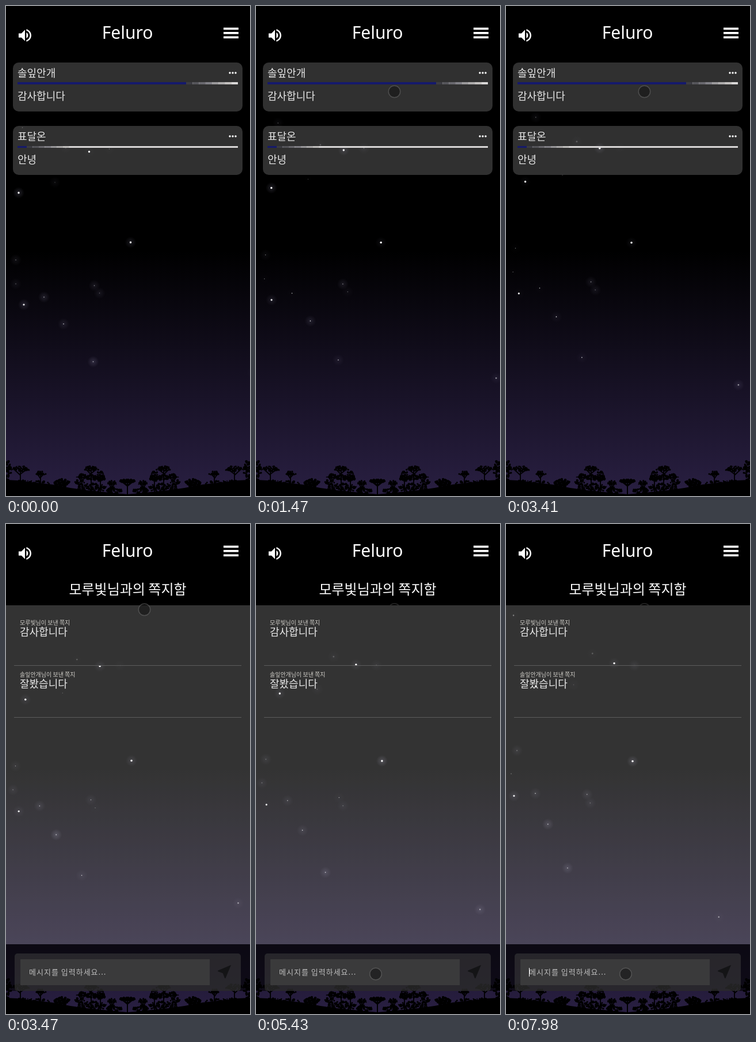
These frames come from a looping animation (424 by 850 pixels, 8 s). An HTML page with a canvas:

```html
<!DOCTYPE html>
<html lang="ko">
<head>
<meta charset="utf-8">
<title>쪽지함</title>
<style>
html, body { margin: 0; width: 100%; height: 100%; overflow: hidden; background: #000; }
canvas { display: block; }
</style>
</head>
<body>
<canvas id="stage" width="424" height="850"></canvas>
<script>
const W = 424, H = 850, LOOP = 8000, OPEN_AT = 3470;
const ctx = document.getElementById('stage').getContext('2d');
const FONT = '"Noto Sans CJK KR", "Noto Sans CJK", sans-serif';
const SPEAKER = new Path2D('M3 9v6h4l5 5V4L7 9H3zm13.5 3c0-1.77-1.02-3.29-2.5-4.03v8.05c1.48-.73 2.5-2.25 2.5-4.02zM14 3.23v2.06c2.89.86 5 3.54 5 6.71s-2.11 5.85-5 6.71v2.06c4.01-.91 7-4.49 7-8.77s-2.99-7.86-7-8.77z');
const SEND = new Path2D('M21 3L3 10.53v.98l6.84 2.65L12.48 21h.98L21 3z');

// x, y at time 0, radius, opacity
const stars = [
  [144.5, 252.8, 1.7, 1], [22, 324, 1.7, 1], [216.5, 410, 1.7, 1], [31, 518, 1.6, .9],
  [100, 551.5, .8, .9], [151.5, 617, .8, .8], [66, 505, .8, .7], [153.5, 485, .8, .55],
  [162.5, 498, .7, .4], [17, 440.5, .7, .5], [17, 482, .7, .45], [179.5, 248, .7, .35],
  [85, 306, .7, .25], [28.5, 211, .8, .35], [103.7, 245.5, 1.4, .2], [427, 636, 1.2, .55],
  [-45.4, 214.4, 1.2, .4]
];

// time, x, y
const pointerKeys = [
  [0, 250, 865], [100, 250, 865], [840, 242, 176], [1000, 240.5, 148.5], [4230, 240.5, 148.5],
  [4690, 206.5, 717.5], [5040, 208, 779], [5300, 208, 780.5], [LOOP, 208, 780.5]
];

const noise = (a, b) => {
  const v = Math.sin(a * 127.1 + b * 311.7) * 43758.5453;
  return v - Math.floor(v);
};

function rect(x, y, w, h, color, radius = 0) {
  ctx.fillStyle = color;
  ctx.beginPath();
  ctx.roundRect(x, y, w, h, radius);
  ctx.fill();
}

function disc(c, x, y, r) {
  c.beginPath();
  c.arc(x, y, r, 0, 7);
  c.fill();
}

function text(value, x, y, size, { color = '#e6e6e6', weight = 300, align = 'left', spacing = 0, family = FONT } = {}) {
  ctx.font = `${weight} ${size}px ${family}`;
  ctx.fillStyle = color;
  ctx.textAlign = align;
  ctx.letterSpacing = spacing + 'px';
  ctx.fillText(value, x, y);
}

function icon(path, x, y, scale, color) {
  ctx.save();
  ctx.translate(x, y);
  ctx.scale(scale, scale);
  ctx.fillStyle = color;
  ctx.fill(path);
  ctx.restore();
}

function makeForest() {
  const layer = document.createElement('canvas');
  layer.width = W;
  layer.height = H;
  const c = layer.getContext('2d');
  let seed = 1;
  const rnd = () => noise(seed++, 3);
  const leaves = (x, y, w, h, count, size = 2) => {
    for (let i = 0; i < count; i++) {
      const a = rnd() * 6.283, d = Math.sqrt(rnd());
      disc(c, x + Math.cos(a) * d * w / 2, y + Math.sin(a) * d * h / 2, size * (.5 + rnd() * .7));
    }
  };
  const tree = (x, top, w, h, base) => {
    leaves(x, top + h / 2, w * .8, h, w * 1.6, 1.5);
    leaves(x, top + h * .7, w, h * .5, w, 1.3);
    c.lineWidth = 1.8;
    c.beginPath();
    c.moveTo(x, base);
    c.lineTo(x, top + h / 2);
    c.moveTo(x, top + h + 6);
    c.lineTo(x - w * .3, top + h * .7);
    c.moveTo(x, top + h + 4);
    c.lineTo(x + w * .3, top + h * .7);
    c.stroke();
  };
  const half = () => {
    leaves(2, 806, 14, 34, 60);
    tree(25, 798, 32, 10, 828);
    tree(60, 807, 18, 7, 830);
    tree(148, 798, 28, 9, 845);
    tree(132, 811, 20, 9, 845);
    tree(164, 807, 16, 11, 845);
    tree(184, 823, 18, 8, 848);
    leaves(97, 827, 26, 15, 75);
    leaves(148, 818, 20, 11, 35);
    leaves(128, 826, 16, 10, 25);
    leaves(165, 820, 15, 9, 30);
    leaves(150, 836, 52, 15, 75);
    leaves(40, 828, 78, 10, 75);
    leaves(188, 840, 26, 11, 45);
    c.beginPath();
    c.moveTo(0, 822);
    for (const [x, y] of [[20, 823], [45, 826], [80, 830], [112, 836], [140, 840], [180, 844], [211, 847], [211, H], [0, H]]) c.lineTo(x, y);
    c.fill();
    tree(211, 821, 32, 6, H);
  };
  half();
  c.setTransform(-1, 0, 0, 1, 422, 0);
  seed = 1;
  half();
  c.setTransform(1, 0, 0, 1, 0, 0);
  c.fillRect(421, 822, 3, 28);
  return layer;
}
const forest = makeForest();

function drawSky(t) {
  const sky = ctx.createLinearGradient(0, 0, 0, H);
  sky.addColorStop(.5, '#000');
  sky.addColorStop(1, '#291f42');
  rect(0, 0, W, H, sky);

  const angle = t / 1000 * 1.75 * Math.PI / 180, tick = Math.floor(t / 50);
  ctx.save();
  ctx.translate(W / 2, H / 2);
  stars.forEach(([x0, y0, r, alpha], i) => {
    const dx = x0 - W / 2, dy = y0 - H / 2;
    const x = dx * Math.cos(angle) - dy * Math.sin(angle);
    const y = dx * Math.sin(angle) + dy * Math.cos(angle);
    const flicker = noise(i + 1, tick + 1);
    const glow = ctx.createRadialGradient(x, y, 0, x, y, 10);
    glow.addColorStop(0, `rgba(190,185,225,${.22 * flicker * alpha})`);
    glow.addColorStop(1, 'rgba(190,185,225,0)');
    ctx.fillStyle = glow;
    disc(ctx, x, y, 10);
    ctx.fillStyle = `rgba(255,255,255,${alpha})`;
    disc(ctx, x, y, r);
  });
  ctx.restore();
  ctx.drawImage(forest, 0, 0);
}

function drawHeader(height) {
  rect(0, 0, W, height, '#000');
  icon(SPEAKER, 18.3, 36.4, 1.22, '#fff');
  text('Feluro', 211, 57, 30, { color: '#fff', weight: 400, align: 'center', family: '"Noto Sans", sans-serif' });
  for (const y of [37.5, 45, 52.5]) rect(378, y, 26, 3.7, '#fff');
}

function drawCard(y, name, message, barY, barHeight, progress, step) {
  rect(12, y, 399, 85, 'rgba(255,255,255,.19)', 10);
  text(name, 20, y + 25, 18);
  text(message, 20, y + 64.5, 18);
  ctx.fillStyle = '#fff';
  for (const x of [389, 394, 399]) disc(ctx, x, y + 18, 1.7);
  rect(20, barY, 383, barHeight, '#d8d6d6');
  ['#3c3c42', '#55555a', '#69686e', '#807f85', '#99989a', '#adabab', '#c2c0be'].forEach((color, i) =>
    rect(progress + i * step, barY, step, barHeight, color));
  rect(20, barY, progress - 20, barHeight, '#151a6c');
}

function drawList() {
  drawHeader(70);
  drawCard(98, '솔잎안개', '감사합니다', 132, 4, 313, 11.3);
  drawCard(208, '표달온', '안녕', 243, 3, 36, 10.5);
}

function drawNote(y, sender, message) {
  text(sender + '님이 보낸 쪽지', 24, y, 10, { color: '#d0cec8', weight: 400 });
  text(message, 24, y + 19, 18);
  rect(14, y + 70, 395, 1, '#5c5c5c');
}

function drawInbox(t) {
  drawHeader(141);
  text('모루빛님과의 쪽지함', 211.5, 122, 24, { color: '#fff', weight: 400, align: 'center' });
  rect(0, 141, W, 588, 'rgba(255,255,255,.2)');
  drawNote(175, '모루빛', '감사합니다');
  drawNote(265, '솔잎안개', '잘봤습니다');

  rect(0, 729, W, 81, 'rgba(0,0,0,.6)');
  rect(15, 745, 393, 65, 'rgba(62,61,62,.56)', 5);
  rect(25, 755, 329, 45, '#3a3a3b');
  text('메시지를 입력하세요...', 40, 782, 13, { color: '#bdbdbd', weight: 400, spacing: 1 });
  icon(SEND, 364.2, 761.2, 1.28, '#141416');
  const caretOn = t >= 6420 && Math.floor((t - 6420) / 530) % 2 === 0;
  if (caretOn) rect(40, 770, 1, 15, '#fff');
}

function drawPointer(t) {
  const i = Math.max(1, pointerKeys.findIndex(key => key[0] > t));
  const [t0, x0, y0] = pointerKeys[i - 1], [t1, x1, y1] = pointerKeys[i];
  const p = (t - t0) / (t1 - t0), ease = p * p * (3 - 2 * p);
  ctx.fillStyle = 'rgba(15,15,15,.52)';
  ctx.strokeStyle = 'rgba(115,115,115,.5)';
  ctx.lineWidth = 1.5;
  disc(ctx, x0 + (x1 - x0) * ease, y0 + (y1 - y0) * ease, 10.2);
  ctx.stroke();

  // Faint trace left on the header edge
  if (t > 4260) {
    ctx.strokeStyle = '#262626';
    ctx.beginPath();
    ctx.arc(240.5, 148.5, 10.5, -2.36, -.78);
    ctx.stroke();
  }
}

function draw(now) {
  const t = now % LOOP;
  drawSky(t);
  if (t < OPEN_AT) drawList();
  else drawInbox(t);
  drawPointer(t);
}

const start = performance.now();
function frame() {
  draw(performance.now() - start);
  requestAnimationFrame(frame);
}
frame();
</script>
</body>
</html>
```
